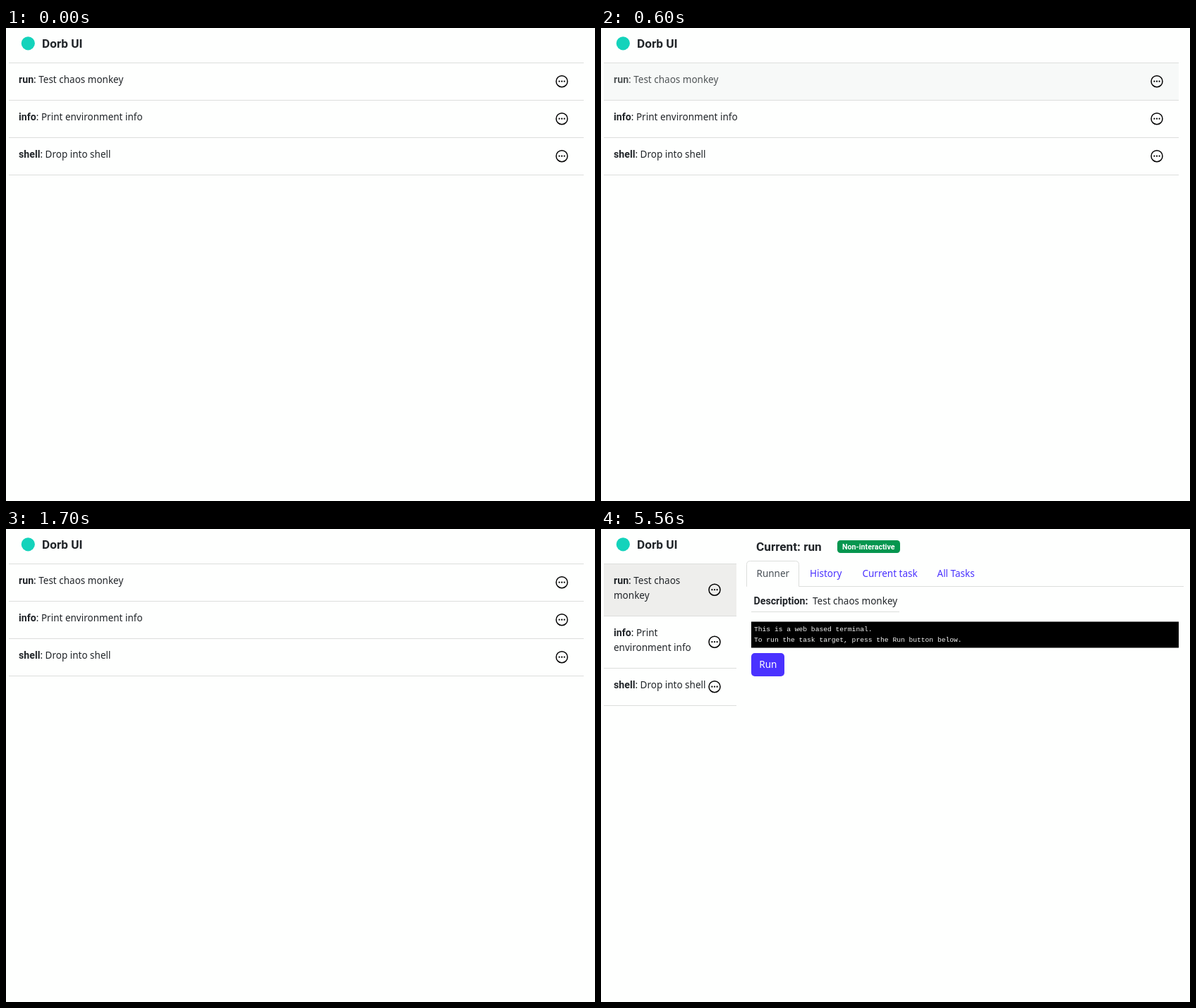
Animation, 835 px wide and 671 px high, one loop 8000 ms. Source, as an HTML page:

```html
<!DOCTYPE html>
<html lang="en">
<head>
<meta charset="utf-8">
<title>Task runner</title>
<style>
  html, body { margin: 0; width: 100%; height: 100%; overflow: hidden; background: #fefffe; }
  svg { display: block; }
  text { font: 13.5px "Noto Sans", sans-serif; fill: #212529; white-space: pre; }
  .bold { font: bold 14.2px Roboto, sans-serif; }
  .title { font: bold 17.2px Roboto, sans-serif; }
  .badge { font: bold 10.7px Roboto, sans-serif; fill: #fff; }
  .link { fill: #4a32ff; }
  .active { fill: #495057; }
  .white { fill: #fff; }
  .line { fill: none; stroke: #dcdedc; }
  .hover text { fill: #4f5456; }
  #terminal text { font: 9.65px "DejaVu Sans Mono", monospace; fill: #f4f4f4; }
  #terminal.loaded text { font-family: "Liberation Mono", monospace; }
</style>
</head>
<body>
<svg width="835" height="671" viewBox="0 0 835 671">
  <defs>
    <g id="menu">
      <circle r="8" fill="none" stroke="#000" stroke-width="1.5"/>
      <circle cx="-3.6" r="1.1"/><circle r="1.1"/><circle cx="3.6" r="1.1"/>
    </g>
  </defs>

  <circle cx="31.3" cy="21.8" r="9.6" fill="#14d3bb"/>
  <text class="title" x="51" y="28">Dorb UI</text>

  <g id="list"></g>

  <g id="detail">
    <g id="sidebar"></g>
    <text class="title" x="220" y="31">Current: run</text>
    <rect x="335" y="16" width="89" height="18" rx="4.5" fill="#05964f"/>
    <text class="badge" x="342" y="29">Non-interactive</text>

    <path class="line" d="M206 81.5h.5V50.5q0-5 5-5h64q5 0 5 5v31H826"/>
    <text class="active" x="220.5" y="68">Runner</text>
    <text class="link" x="296" y="68">History</text>
    <text class="link" x="370.5" y="68">Current task</text>
    <text class="link" x="476.5" y="68">All Tasks</text>

    <text class="bold" x="216.5" y="107">Description:</text>
    <text x="300" y="107">Test chaos monkey</text>
    <path class="line" d="M213 117.5H423"/>

    <g id="terminal">
      <rect x="213" y="131.5" width="606" height="37"/>
      <text x="217" y="145">This is a web based terminal.</text>
      <text x="217" y="160">To run the task target, press the Run button below.</text>
    </g>

    <rect x="213" y="176" width="47" height="33" rx="5" fill="#4a32ff"/>
    <text class="white" x="224.3" y="197">Run</text>
  </g>
</svg>
<script>
  const LOOP = 8000;
  const byId = id => document.getElementById(id);

  // Stacks task rows; each row is [name, first line, optional second line].
  function buildRows(rows, right, menuX, selected) {
    let top = 49;
    let markup = `<path class="line" d="M4 49.5H${right}"/>`;
    for (const [name, first, second] of rows) {
      const height = second ? 74 : 53;
      const fill = name === selected ? "#eeeeec" : "none";
      markup += `<g>
        <rect x="4" y="${top + 1}" width="${right - 4}" height="${height - 1}" fill="${fill}"/>
        <text x="18" y="${top + 29}"><tspan class="bold">${name}</tspan>: ${first}</text>
        ${second ? `<text x="18" y="${top + 50}">${second}</text>` : ""}
        <use href="#menu" x="${menuX}" y="${top + height / 2 + 0.2}"/>
        <path class="line" d="M4 ${top + height + 0.5}H${right}"/>
      </g>`;
      top += height;
    }
    return markup;
  }

  byId("list").innerHTML = buildRows([
    ["run", "Test chaos monkey"],
    ["info", "Print environment info"],
    ["shell", "Drop into shell"]
  ], 819, 788, null);

  byId("sidebar").innerHTML = buildRows([
    ["run", "Test chaos", "monkey"],
    ["info", "Print", "environment info"],
    ["shell", "Drop into shell"]
  ], 192, 161, "run");

  const firstRow = byId("list").querySelector("g");
  const firstFill = firstRow.querySelector("rect");

  function render(now) {
    const time = now % LOOP;
    const hovered = time >= 600 && time < 1700;
    const opened = time >= 1800;
    byId("list").style.display = opened ? "none" : "";
    byId("detail").style.display = opened ? "" : "none";
    firstRow.classList.toggle("hover", hovered);
    firstFill.setAttribute("fill", hovered ? "#f7f9f8" : "none");
    byId("terminal").classList.toggle("loaded", time >= 1900);
  }

  const start = performance.now();
  function tick() {
    render(performance.now() - start);
    requestAnimationFrame(tick);
  }
  tick();
</script>
</body>
</html>
```
